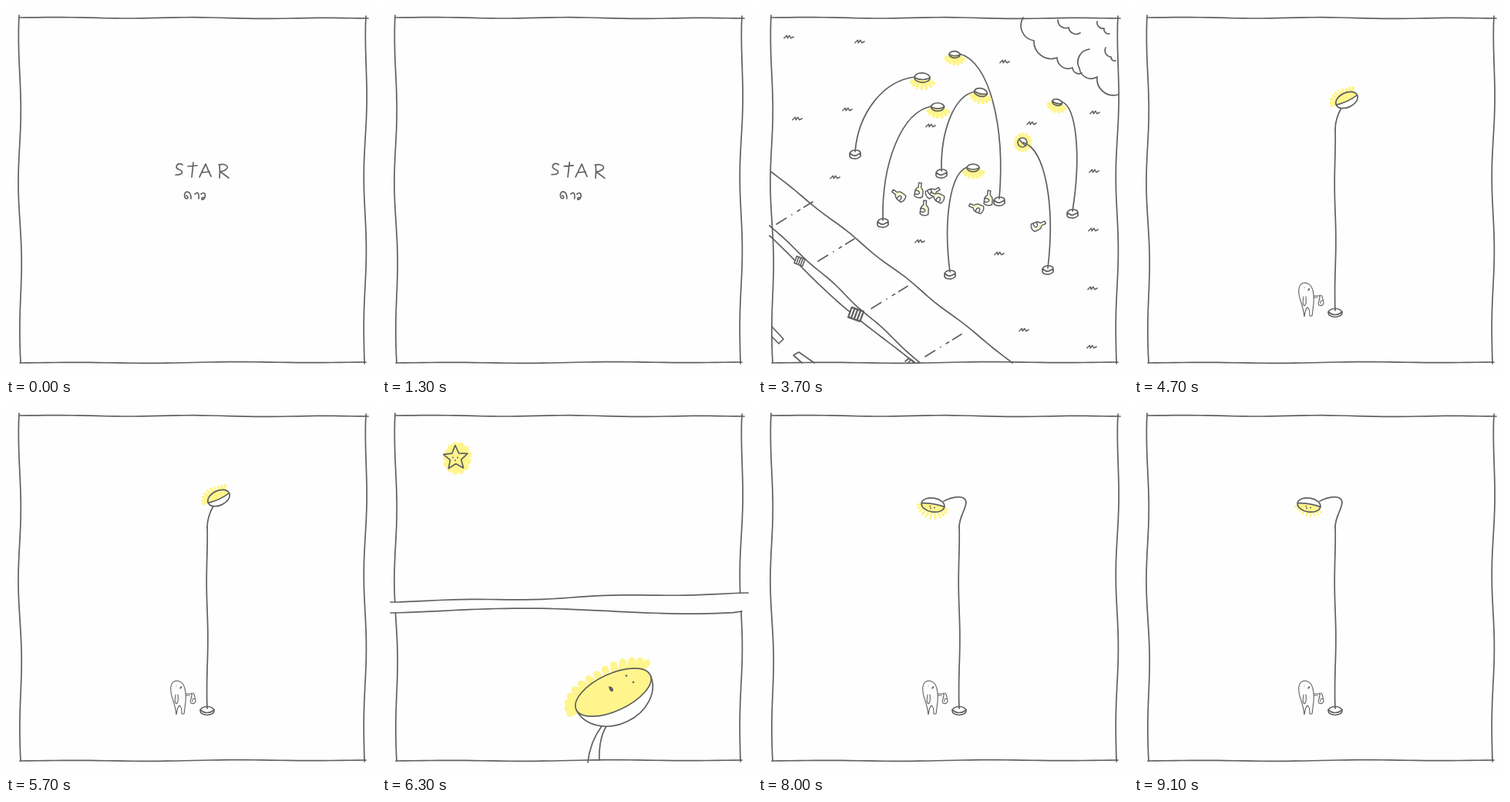
Recreate the animation shown at these times as an HTML page. Size 480 by 480 pixels, loop 9200 ms.

```html
<!DOCTYPE html>
<html lang="en">
<head>
<meta charset="utf-8">
<title>Star</title>
<style>
html, body { margin: 0; width: 100%; height: 100%; overflow: hidden; background: #fefefe; }
svg { display: block; width: 100vw; height: 100vh; fill: none; stroke: #606060; stroke-width: 1.7; stroke-linecap: round; stroke-linejoin: round; }
</style>
</head>
<body>
<svg id="stage" viewBox="0 0 480 480" role="img" aria-label="Star"></svg>
<script>
const LOOP = 9200, STEP = 100, SCENE_STEPS = 20;
const INK = '#606060', YELLOW = '#fff58c', PAPER = '#fefefe';
const { PI, sin, cos, abs, sign, max, hypot } = Math;
const fmt = v => +v.toFixed(2);
const range = n => [...Array(n).keys()];

const path = (d, attrs = '') => `<path d="${d}" ${attrs}/>`;
const filled = (d, color) => path(d, `fill="${color}" stroke="none"`);
const dot = (x, y, r = 1) => `<circle cx="${x}" cy="${y}" r="${r}" fill="${INK}" stroke="none"/>`;
const place = (x, y, rot, body, scale = 1) =>
  `<g transform="translate(${x} ${y}) rotate(${rot}) scale(${scale})">${body}</g>`;

// Hand-drawn line: a straight run with a sine wobble that fades at both ends
function wave(x1, y1, x2, y2, amp, cycles, phase = 0) {
  const dx = x2 - x1, dy = y2 - y1, len = hypot(dx, dy);
  const points = range(41).map(i => {
    const u = i / 40, off = amp * sin(2 * PI * cycles * u + phase) * max(0, sin(PI * u)) ** 0.5;
    return `${fmt(x1 + dx * u + off * dy / len)} ${fmt(y1 + dy * u - off * dx / len)}`;
  });
  return path('M' + points.join('L'));
}

// Row of leafy arcs between key points
function scallops(text) {
  const n = text.split(' ').map(Number);
  let d = `M${n[0]} ${n[1]}`;
  for (let i = 2; i < n.length; i += 2) {
    const r = 0.6 * hypot(n[i] - n[i - 2], n[i + 1] - n[i - 1]);
    d += `A${fmt(r)} ${fmt(r)} 0 0 0 ${n[i]} ${n[i + 1]}`;
  }
  return path(d);
}

// Petals radiating from part of an ellipse
function rays(rx, ry, from, to, count, len, width, odd) {
  const d = range(count).map(i => {
    const a = (from + (to - from) * (i + (odd ? 0.5 : 0.3)) / count) * PI / 180;
    const l = len * (0.65 + 0.4 * abs(sin(i * 12.9 + odd * 4)));
    return `M${fmt(rx * 0.8 * cos(a))} ${fmt(ry * 0.8 * sin(a))}L${fmt((rx + l) * cos(a))} ${fmt((ry + l) * sin(a))}`;
  });
  return path(d.join(''), `stroke="${YELLOW}" stroke-width="${width}"`);
}

// Lamp head, lit below (side 1) or above (side 0) its dividing line
function head(rx, ry, bulge, side) {
  const rim = `M${-rx} 0Q0 ${bulge} ${rx} 0`;
  return `<ellipse rx="${rx}" ry="${ry}" fill="${PAPER}" stroke="none"/>` +
    filled(`${rim}A${rx} ${ry} 0 0 ${side} ${-rx} 0Z`, YELLOW) +
    path(rim) + `<ellipse rx="${rx}" ry="${ry}"/>`;
}

const frame = wave(17, 12, 19, 463, 2, 2.2, -2) + wave(17, 15, 470, 16, 0.8, 2.5) +
  wave(467, 13, 465, 464, 1.9, 2.2, -1.6) + wave(18, 463, 467, 462, 0.8, 2);

// Hand lettering; every other drawing leans a little
function title(odd) {
  const letters = path('M229 206C222 202 218 210 224 212S231 219 220 219' +
    'M243 203Q242 212 241 222M236 208L248 207M251 222Q256 211 259 205Q262 213 266 221M254 216L264 215' +
    'M277 206Q278 214 277 223M276 206C288 203 293 212 278 215L289 223' +
    'M234 246C239 249 233 252 232 248C229 239 241 238 240 250' +
    'M245 244Q251 239 250 250M253 244C260 238 260 252 254 251Q254 247 257 249');
  return place(254, 227, odd * 0.6, place(-254, -227, 0, letters));
}

// Head x y, base x y, head radius, tilt
const lamps = [
  [213, 93, 126, 192, 10, 2], [255, 63, 313, 253, 7, 3], [233, 131, 162, 281, 8.5, 0],
  [289, 112, 238, 217, 8.5, 12], [388, 125, 408, 269, 6.5, 14], [279, 210, 249, 348, 8, 0]
];

// Poles rise from the base, bow outwards and bend over to the head
function pole(x, y, bx, by) {
  const dx = x - bx, dy = y - by, bow = -sign(dx) * max(0, -0.1 * dy - 0.16 * abs(dx));
  return path(`M${bx} ${by}C${fmt(bx + dx * 0.05 + bow)} ${fmt(by + dy * 0.5)} ` +
    `${fmt(bx + dx * 0.45 + bow)} ${fmt(by + dy * 0.95)} ${x} ${y}`);
}

function base(x, y) {
  return place(x, y, 0, path('M-7 -1Q-5 -5 0 -5Q7 -5 7 -1V3Q3 7 -1 6Q-6 6 -7 3ZM-7 -1Q-2 3 1 2L7 -1', `fill="${PAPER}"`));
}

function lamp([x, y, bx, by, r, tilt], odd) {
  const side = sign(bx - x);
  return place(x, y, tilt, rays(r, r * 0.6, 20, 160, 7, 8, 4.2, odd)) +
    base(bx, by) + pole(x + side * r * 0.9, y - 1, bx, by - 3) +
    place(x, y, tilt, head(r, r * 0.62, r * 0.5, 1));
}

function facingLamp(x, y, bx, by, odd) {
  return place(x, y, 0, rays(6, 6, 0, 360, 14, 5, 4, odd)) + base(bx, by) +
    place(x, y, 45, head(6, 6, 1, 1)) + pole(x + 1, y, bx, by - 2);
}

const bottles = [
  [183, 246, -52], [209, 240, 8], [226, 242, 62], [233, 248, -62],
  [216, 263, 4], [284, 262, -68], [299, 250, 5], [363, 285, 66]
];
function bottle([x, y, rot], odd) {
  return place(x, y, rot,
    path('M-2 -12V-5C-7 -3 -6 3 -6 8Q0 12 6 8C6 2 7 -3 2 -5V-12Z', `fill="${PAPER}"`) +
    path('M-5.5 0Q1 -1 1 3Q0 6 -5.5 5') +
    path(`M${odd} -5L2 -2M3 0L4 3`, `stroke="${YELLOW}"`), 0.88);
}

const tuft = (x, y) => place(x, y, 0, path('M-7 2L-3 -2L-2 2L1 -2L3 2L7 0'), 0.88);
const tufts = (count, x, dx, y, dy) => range(count).map(i => tuft(x + dx * i, y + dy * i)).join('');
const grass = tufts(5, 437, -1, 138, 76) + tufts(2, 40, 11, 40, 106) + tufts(3, 132, -16, 46, 88) +
  tufts(2, 320, 35, 72, 80) + tufts(2, 224, -14, 155, 150) + tufts(2, 313, 32, 321, 99);

const bushes = [
  '344 15 358 45 388 67 408 80 420 87', '430 56 417 81 440 92 467 115',
  '389 18 403 28 418 35', '440 20 449 29 456 36', '451 54 458 66 464 71'
].map(scallops).join('');

const grate = (x, y, s) => place(x, y, 20,
  path('M-6 -5H6V5H-6ZM-3 -5V5M0 -5V5M3 -5V5', `fill="${PAPER}"`), s);

const lane = [24, 78, 147, 217].map(x => {
  const y = fmt(283 + (x - 24) * 0.89);
  return path(`M${x} ${y}l47 -29`, 'pathLength="45" stroke-dasharray="12 7 .1 7 3 5 20"');
}).join('');

const road = wave(17, 215, 330, 463, 1, 4) + wave(15, 285, 210, 463, 1, 3) +
  wave(15, 298, 203, 463, -6, 0.5) + lane + grate(54, 331, 0.95) + grate(127, 400, 1.35) +
  path('M191 461L196 457L203 462M195 463L198 459M18 416L33 432L27 438L18 429M57 463L46 453L53 449L73 463');

const park = odd => bushes + grass + road + lamps.map(l => lamp(l, odd)).join('') +
  facingLamp(343, 177, 376, 342, odd) + bottles.map(b => bottle(b, odd)).join('');

const figure = path('M221 403Q220 394 217 385C212 372 212 359 222 359C232 360 234 371 233 386L231 402H228Q228 392 225 391Q222 394 221 403Z' +
  'M220 377Q218 388 221 389Q224 388 223 377M233 376H242M233 378H238' +
  'M241 375C242 381 237 387 240 388Q244 390 246 386Q245 378 243 375M245 382Q241 382 242 386', 'stroke-width="1.1"') +
  dot(227, 367.5, 1.2) + dot(221, 365.5, 0.6) + dot(226, 369, 0.8);

// Shared by both close views of one lamp: top bends into the shaft at 261,160
const street = top => path(top) + wave(261, 160, 261, 395, 0.9, 1.5, 2) +
  '<ellipse cx="261" cy="398" rx="9" ry="5.5"/>' + path('M252 397Q261 404 270 397') + figure;

const lookUp = odd => street('M269 132Q261 147 261 160') +
  place(276, 122, -25, rays(14, 8.5, 180, 322, 10, odd ? 8 : 7, 3.4, odd) + head(15, 9.5, 3, 0));

const lookDown = odd => street('M241 126C252 120 270 117 270 128C269 138 261 146 261 160') +
  place(227, 131, 9, (odd ? rays(14, 8, 22, 165, 9, 6, 2.6, 1) : rays(14, 8, 8, 180, 11, 9, 3, 0)) + head(15, 9, -3, 1)) +
  dot(223, 132.5, 0.9) + dot(229, 134.5, 0.9) + dot(224, 135, 0.9);

const starPoints = range(10).map(i => {
  const a = (i * 36 - 92) * PI / 180, r = i % 2 ? 7.5 : 16.5;
  return `${fmt(95.5 + r * cos(a))} ${fmt(70 + r * sin(a))}`;
}).join('L');

function meet(odd) {
  const star = place(97, 70, 0, rays(9, 11, 0, 360, 13, odd ? 6.5 : 11, 8, odd)) +
    path(`M${starPoints}Z`, `fill="${YELLOW}"`) + dot(92, 69.5) + dot(98, 69.5) + dot(95, 73);
  const gutter = filled('M8 257H28V270H8ZM455 246H475V268H455Z', PAPER) +
    wave(11, 257, 475, 245, 1.5, 2.2, -0.8) + wave(11, 271, 467, 269, 5.5, 0.75);
  const lampFace = place(300, 374, -25,
    rays(52, 23, 172, 338, 14, odd ? 11 : 13, 9, odd) +
    path('M-53 0A53 42 0 0 0 53 0', `fill="${PAPER}"`) +
    `<ellipse rx="53" ry="24" fill="${YELLOW}"/>`) +
    dot(317, 352.5, 1.3) + dot(326, 361, 1.3) +
    path('M295 367Q300 368 299 372Q296 373 295 367Z', `fill="${INK}"`);
  const neck = path('M285 418Q270 438 267 465M291 418Q281 435 282 462');
  return gutter + star + neck + lampFace;
}

const cels = [title, park, lookUp, meet, lookDown].map(draw => [0, 1].map(odd => frame + draw(odd)));
const stage = document.getElementById('stage');
let shown = '';

function update(time) {
  const step = Math.floor(time % LOOP / STEP);
  const cel = cels[Math.floor(step / SCENE_STEPS)][step % 2];
  if (cel !== shown) stage.innerHTML = shown = cel;
}
function tick() {
  update(performance.now());
  requestAnimationFrame(tick);
}
tick();
</script>
</body>
</html>
```
